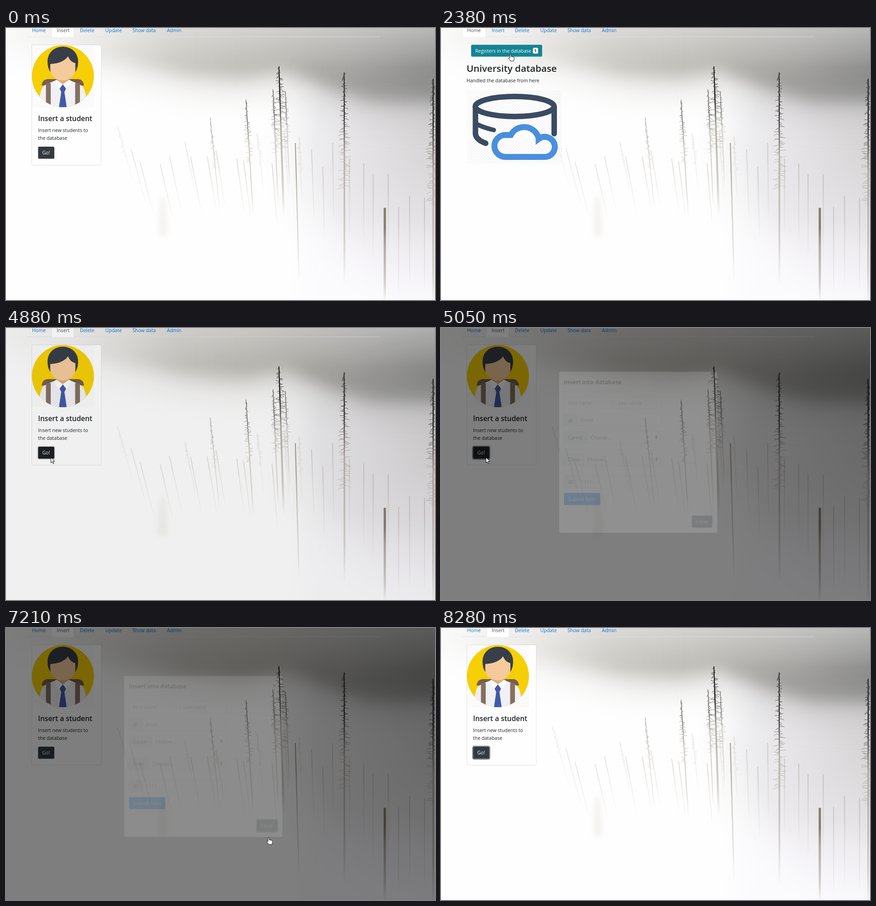
Recreate the animation shown at these times as an HTML page with a canvas. Size 940x596 px, loop 9.15 s.

```html
<!DOCTYPE html>
<html lang="en">
<head>
<meta charset="utf-8">
<title>Student database</title>
<style>
  html, body { margin: 0; width: 100%; height: 100%; overflow: hidden; background: #fefefe; }
  canvas, svg { position: absolute; left: 0; top: 0; width: 940px; height: 596px; }
  text { font: 10.5px "Open Sans", "Noto Sans", sans-serif; fill: #212529; white-space: pre; }
  .h1, .h2, .h3 { font-weight: 600; }
  .h1 { font-size: 20.6px; }
  .h2 { font-size: 15.5px; }
  .h3 { font-size: 13px; }
  .light { fill: #fff; }
  .hint { fill: #6c757d; }
  .label { fill: #495057; }
  .link { fill: #0a74dc; }
  .hover { fill: #0056b3; }
  .box { fill: #fff; stroke: #ced4da; stroke-width: .8; }
  .addon { fill: #e9ecef; stroke: #ced4da; stroke-width: .8; }
  .tab { fill: #fff; stroke: #dee2e6; stroke-width: .7; }
  .rule { stroke: #dee2e6; stroke-width: .8; }
  .ring { fill: none; stroke-width: 2.4; stroke-opacity: .5; }
  .ink { fill: none; stroke: #3a4b62; stroke-width: 12; stroke-linecap: round; }
</style>
</head>
<body>
<canvas id="photo" width="940" height="596"></canvas>
<svg viewBox="0 0 940 596">
  <defs>
    <pattern id="hatch" width="4.6" height="4.6" patternUnits="userSpaceOnUse" patternTransform="rotate(45)">
      <rect width="1.6" height="4.6" fill="#777" opacity=".08"/>
    </pattern>
    <clipPath id="disc"><circle cx="124.7" cy="105.5" r="68"/></clipPath>
  </defs>

  <!-- navigation -->
  <path class="rule" d="M46 19.3H819"/>
  <g id="tabHome"><rect class="tab" x="46" y="-6" width="52" height="25.6"/><path stroke="#fff" d="M46.5 19.3H97.5"/></g>
  <g id="tabInsert"><rect class="tab" x="99.5" y="-6" width="49.5" height="25.6"/><path stroke="#fff" d="M100 19.3H148.5"/></g>
  <text id="linkHome" x="57.3" y="9.3">Home</text>
  <text id="linkInsert" x="111" y="9.3">Insert</text>
  <g id="insertHover">
    <path fill="none" stroke="#e9ecef" stroke-width=".8" d="M99.5 0V19M149 0V19"/>
    <text class="hover" x="111" y="9.3">Insert</text>
  </g>
  <text class="link" x="162" y="9.3">Delete</text>
  <text class="link" x="217.6" y="9.3">Update</text>
  <text class="link" x="277.2" y="9.3">Show data</text>
  <text class="link" x="352.5" y="9.3">Admin</text>

  <g id="home">
    <rect id="regRing" class="ring" x="65" y="35.8" width="157.5" height="28" rx="3.6" stroke="#17a2b8"/>
    <rect id="reg" x="66" y="36.7" width="155.6" height="26" rx="2.8"/>
    <text class="light" x="75" y="53.5">Registers in the database</text>
    <rect x="201.3" y="43.3" width="11.4" height="12.8" rx="2.6" fill="#f8f9fa"/>
    <text x="204.6" y="52.8" style="font-size:8px;font-weight:700">1</text>
    <text class="h1" x="56" y="96">University database</text>
    <text x="56" y="118.5">Handled the database from here</text>
    <rect x="57" y="137" width="208" height="160" fill="url(#hatch)"/>
    <ellipse class="ink" cx="161.5" cy="172" rx="86.3" ry="22"/>
    <path class="ink" d="M75.5 174V232Q77 245 98 252.5"/>
    <path class="ink" style="stroke-width:10" d="M77 210Q92 218 115.5 223.5"/>
    <path class="ink" d="M248 174V231.5"/>
    <path d="M141 282.5A24 24 0 0 1 141 234.5L153 234.5A33 33 0 0 1 214 241.5V243A22 22 0 1 1 228 282.5Z"
      fill="#fefefe" stroke="#4a8fde" stroke-width="13"/>
    <path d="M141 276A18 18 0 0 1 141 241H228V276Z" fill="url(#hatch)"/>
  </g>

  <g id="insert">
    <rect x="56.5" y="37" width="152.3" height="263.5" rx="2.8" fill="#fefefe" stroke="#000" stroke-opacity=".14" stroke-width=".8"/>
    <g clip-path="url(#disc)">
      <rect x="56" y="37" width="138" height="137" fill="#f9d100"/>
      <path fill="#775c4e" d="M78 126Q80 112 92 112H157Q169 112 171 126Z"/>
      <path fill="#f3f3f8" d="M72 176Q73 133 84 126Q94 121 110 114L124.5 122L139 114Q155 121 165 126Q176 133 178 176Z"/>
      <path fill="#84705f" d="M87.5 121H98V168H87.5ZM151.5 121H162V168H151.5Z"/>
      <path fill="#dfae74" d="M111 106H138V114L124.5 124L111 114Z"/>
      <path fill="#fff" d="M110 113L124.5 123L115 134L106 118ZM139 113L124.5 123L134 134L143 118Z"/>
      <path fill="#4059a6" d="M124.5 123.5L131.5 133L128 140L133 174H116L121 140L117.5 133Z"/>
    </g>
    <path fill="#363c47" d="M91 74C91 30 158 30 158 74Q158 87 152 96H97Q91 87 91 74Z"/>
    <path fill="#f8cc9c" d="M97 79Q126 77 136 62Q140 74 152 77V91C152 104 138 115 124.5 115S97 104 97 91Z"/>
    <rect x="57" y="37.5" width="136" height="136" fill="url(#hatch)"/>
    <text class="h2" x="70.3" y="204">Insert a student</text>
    <text x="70.3" y="228">Insert new students to</text>
    <text x="70.3" y="244.6">the database</text>
    <rect id="goRing" class="ring" x="69.3" y="259" width="37.7" height="28.6" rx="3.6" stroke="#343a40"/>
    <rect id="go" x="70.3" y="260" width="35.6" height="26.5" rx="2.8"/>
    <text class="light" x="79.4" y="277.2">Go!</text>
  </g>

  <rect id="shade" width="940" height="596"/>

  <g id="modal">
    <rect x="258.6" y="126.8" width="347" height="353" rx="3.3" fill="#fff" stroke="#000" stroke-opacity=".2" stroke-width=".8"/>
    <text class="h3" x="269.6" y="154">Insert into database</text>
    <path stroke="#7f7f7f" stroke-width="1.7" d="M585 145.3L591.6 151.9M591.6 145.3L585 151.9"/>
    <path class="rule" d="M259 170.5H605.5M259 430.5H605.5"/>
    <g id="fields"></g>
    <rect x="269.6" y="392.5" width="79.5" height="26.3" rx="2.8" fill="#007bff"/>
    <text class="light" x="278.5" y="409.8">Submit form</text>
    <rect id="closeRing" class="ring" x="548.7" y="441" width="46.7" height="28.4" rx="3.6" stroke="#6c757d"/>
    <rect id="close" x="549.7" y="442" width="44.7" height="26.4" rx="2.8"/>
    <text class="light" x="558.4" y="459.2">Close</text>
  </g>

  <g id="cursor" stroke="#000" stroke-width=".9" stroke-linejoin="round" fill="#fff">
    <path id="arrow" d="M.5 .5V12.4L3.2 9.9L5.1 14.2L7 13.4L5.2 9.2H8.8Z"/>
    <path id="hand" d="M-1.2 8.6V1Q0 -1 1.3 1V5.4Q2.8 4.6 3.8 5.9Q5.2 5.2 6.2 6.5Q8 6 8.3 8V11Q8 13 6.9 15.4H.2Q-1.5 12.4-4 9.4Q-4 7.4-1.2 8.6Z"/>
  </g>
</svg>

<script>
const LOOP = 9150, STEP = 77.8;
const $ = id => document.getElementById(id);

// Foggy forest
const g = $('photo').getContext('2d');
let seed = 11;
const rnd = () => (seed = (seed * 16807) % 2147483647) / 2147483647;

function spread(grad, ...colors) {
  colors.forEach((c, i) => grad.addColorStop(i / (colors.length - 1), c));
  return grad;
}

function soft(blur, alpha, fill, points) {
  g.save();
  g.filter = `blur(${blur}px)`;
  g.globalAlpha = alpha;
  g.fillStyle = fill;
  g.beginPath();
  points.forEach(([x, y]) => g.lineTo(x, y));
  g.fill();
  g.restore();
}

// Trunks that rise above the mist are black and carry boughs; all fade out downwards.
function tree(x, top, bottom, width, ink = Math.min(1, .45 + .12 * width)) {
  const h = bottom - top, lean = Math.max(0, 750 - x) * .07;
  const pale = Math.min(1, Math.max(0, (top - 130) / 100));
  const head = `rgba(${20 + 115 * pale},${18 + 107 * pale},${16 + 94 * pale},${ink})`;
  const haze = a => `rgba(160,151,136,${ink * a})`;
  const bare = top > 250, tip = bare ? width : width * .35;
  g.fillStyle = g.strokeStyle = spread(g.createLinearGradient(0, top, 0, bottom),
    head, head, haze(.8), haze(.6), haze(.4), haze(0));
  g.beginPath();
  g.moveTo(x - tip / 2, top);
  g.lineTo(x + tip / 2, top);
  g.lineTo(x + lean + width / 2, bottom);
  g.lineTo(x + lean - width / 2, bottom);
  g.fill();
  if (bare) return;
  g.lineWidth = .65;
  for (let y = top + 4; y < top + h * .55; y += 2.4) {
    const p = (y - top) / h, x0 = x + lean * p;
    const reach = (rnd() < .5 ? -1 : 1) * width * 3.6 * (.25 + rnd() * .75) * Math.min(1, .3 + p * 2);
    g.beginPath();
    g.moveTo(x0, y);
    g.quadraticCurveTo(x0 + reach * .6, y - 1, x0 + reach, y + (rnd() - .35) * 8);
    g.stroke();
  }
}

function drawPhoto() {
  g.fillStyle = '#fefefe';
  g.fillRect(0, 0, 940, 596);
  g.fillStyle = spread(g.createRadialGradient(960, 250, 0, 960, 250, 420),
    '#d4d2d2', '#e1dfe1', '#edecee', 'rgba(254,254,254,0)');
  g.fillRect(0, 0, 940, 596);
  soft(30, .45, '#f8f7fc', [[680, 430], [980, 480], [980, 640], [640, 640]]);

  const sky = spread(g.createLinearGradient(0, 0, 940, 0),
    '#f6f6f5', '#e6e5e2', '#c9c7c1', '#bcbab3', '#aaa9a6', '#929291');
  const cloud = [[-60, -60], [1000, -60], [1000, 155], [820, 155], [740, 138], [610, 90],
    [520, 108], [400, 100], [250, 70], [-60, 10]];
  soft(36, .5, sky, cloud.map(([x, y]) => [x, y + 28]));
  soft(18, 1, sky, cloud);
  soft(14, .22, '#7f7f7e', [[620, 90], [760, 100], [1000, 75], [1000, 160], [790, 158]]);
  g.fillStyle = spread(g.createLinearGradient(0, 0, 0, 85), 'rgba(255,255,255,.34)', 'rgba(255,255,255,0)');
  g.fillRect(0, 0, 940, 85);

  for (let x = 236; x < 920; x += 28) {
    const top = 215 + rnd() * 85 + Math.max(0, x - 660) * .5;
    tree(x + rnd() * 18, top, top + 125 + Math.max(0, x - 500) * .2, 1.9, .14 + x * .0002);
  }
  // x, top, bottom, width
  [[598, 84, 410, 5], [585, 134, 390, 2.6], [612, 138, 350, 2.2], [526, 157, 410, 2.7], [447, 195, 400, 1.6],
   [741, 97, 560, 4.2], [936, 111, 620, 4.6], [634, 252, 550, 2.2], [830, 394, 600, 5]]
    .forEach(t => tree(...t));
  soft(6, .12, '#a39a86', [[338, 372], [348, 372], [354, 455], [334, 455]]);
}
drawPhoto();

// Form rows
function field(x, y, w, hint, label = '', addon = 0, select = false) {
  const mark = select ? `<path fill="#343a40" d="M469 ${y + 12}l2.8-3.2l2.8 3.2ZM469 ${y + 14.2}l2.8 3.2l2.8-3.2Z"/>` : '';
  const side = addon ? `<rect class="addon" x="${x}" y="${y}" width="${addon}" height="26.4" rx="2.6"/>
    <text class="label" x="${x + 9}" y="${y + 17.3}">${label}</text>` : '';
  return `<rect class="box" x="${x + addon}" y="${y}" width="${w - addon}" height="26.4" rx="2.6"/>${side}
    <text class="${select ? 'label' : 'hint'}" x="${x + addon + 8.8}" y="${y + 17.3}">${hint}</text>${mark}`;
}
const row = (y, ...rest) => field(269.7, y, 213.8, ...rest);
$('fields').innerHTML =
  field(269.7, 182, 103.7, 'First name') + field(380, 182, 103.5, 'Last name') +
  row(219.7, 'Email', '@', 28) +
  row(257.2, 'Choose...', 'Career', 49.6, true) +
  row(306, 'Choose...', 'Class', 42.6, true) +
  row(355, '1111..', 'ID', 28);

// Motion: stops are [ms, value, easing]
const anims = [];
function track(id, prop, stops) {
  const all = [[0, stops[0][1]], ...stops, [LOOP, stops[stops.length - 1][1]]];
  const frames = all.map(([t, v, easing = 'linear']) => ({ offset: t / LOOP, [prop]: v, easing }));
  const anim = $(id).animate(frames, { duration: LOOP, fill: 'both' });
  anim.pause();
  anims.push(anim);
}

// Alternates between two values, switching at each of the times.
function toggle(id, prop, pair, times, ms = 150) {
  track(id, prop, times.flatMap((t, i) => [[t, pair[i % 2]], [t + ms, pair[(i + 1) % 2]]]));
}
const fade = (id, pair, ...times) => toggle(id, 'opacity', pair, times);
const flip = (id, pair, ...times) => toggle(id, 'opacity', pair, times, 0);

const FADE = 150, SLIDE = 300;
const toHome = 1190, register = 2600, toInsert = 3780, press = 4840, open = 4858, shut = 7075;
const shown = open + FADE, hidden = shut + SLIDE;
const LINK = '#0a74dc', ACTIVE = '#495057';

flip('tabHome', [0, 1], toHome, toInsert);
flip('tabInsert', [1, 0], toHome, toInsert);
flip('insertHover', [0, 1], 3380, toInsert);
toggle('linkHome', 'fill', [LINK, ACTIVE], [toHome, toInsert], 0);
toggle('linkInsert', 'fill', [ACTIVE, LINK], [toHome, toInsert], 0);
fade('insert', [1, 0], toHome, toInsert + FADE);
fade('home', [0, 1], toHome + FADE, toInsert);

toggle('reg', 'fill', ['#17a2b8', '#138496'], [2150, 2920]);
toggle('go', 'fill', ['#343a40', '#1d2124'], [4410, 5400]);
toggle('close', 'fill', ['#6c757d', '#5a6268'], [6500]);
fade('regRing', [0, 1], register);
fade('goRing', [0, 1], press, 5400, hidden + FADE);
fade('closeRing', [0, 1], shut - 100);

fade('shade', [0, .5], open, hidden);
fade('modal', [0, 1], shown, shut);
const up = 'translateY(-35px)', rest = 'translateY(0px)';
track('modal', 'transform', [[shown, up, 'ease-out'], [shown + SLIDE, rest], [shut, rest, 'ease-out'], [hidden, up]]);

// ms, x, y of the pointer tip
const path = [[210, 829, 580], [1050, 64, 4], [1600, 66, 5], [1980, 112, 183], [2370, 152, 57], [2760, 152, 57],
  [3460, 129, 11], [4060, 129, 11], [4480, 98, 283], [5350, 98, 283], [5500, 261, 232], [6420, 549, 439],
  [6660, 575.5, 459], [7210, 575.5, 459], [7810, 876, 567], [8030, 877, 568], [8210, 892, 600]];
track('cursor', 'transform', path.map(([t, x, y]) => [t, `translate(${x}px,${y}px)`]));
flip('cursor', [0, 1], 205, 8205);
const overLinks = [1000, 1700, 2200, 2920, 3380, 4100, 6560, 7270];
flip('hand', [0, 1], ...overLinks);
flip('arrow', [1, 0], ...overLinks);

const start = performance.now();
function tick() {
  const t = Math.max(0, performance.now() - start) % LOOP;
  const held = t < 210 ? 0 : 200 + Math.floor((t - 200) / STEP) * STEP + 6;
  anims.forEach(a => { a.currentTime = held; });
  requestAnimationFrame(tick);
}
tick();
</script>
</body>
</html>
```
